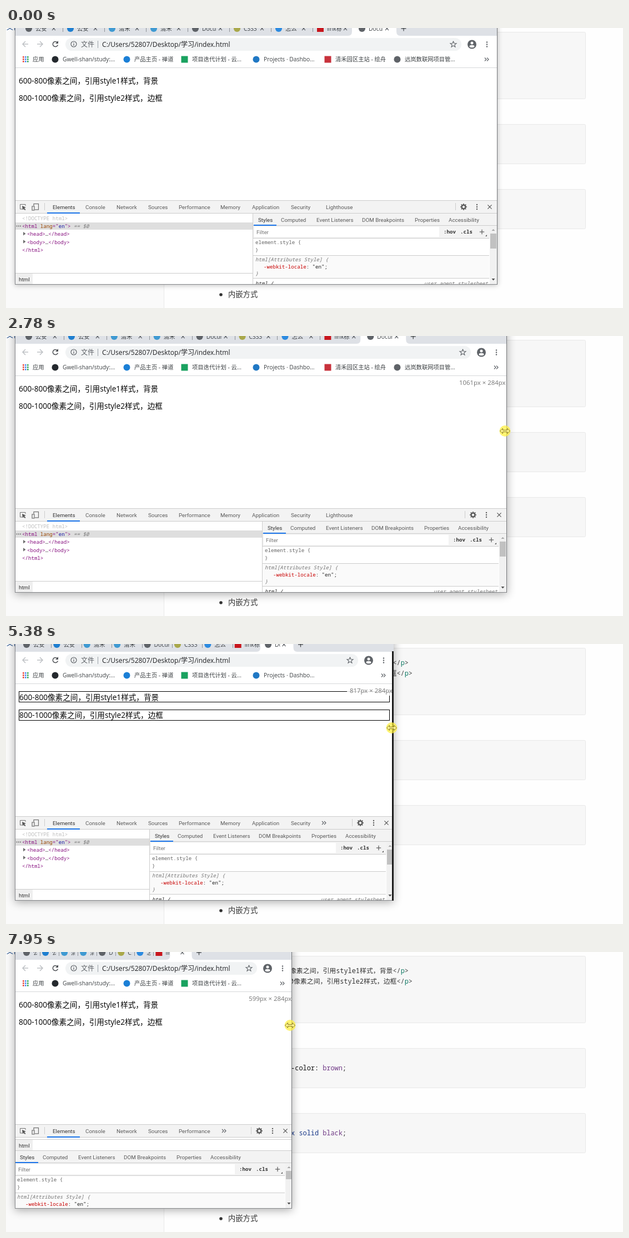
Animation, 1111 px wide and 504 px high, one loop 8000 ms. Source, as an HTML page with a canvas:

```html
<!DOCTYPE html>
<html lang="zh">
<head>
<meta charset="utf-8">
<title>Responsive resize</title>
<style>
html, body { margin: 0; width: 100%; height: 100%; overflow: hidden; background: #fff; }
canvas { display: block; width: 100vw; height: 100vh; }
</style>
</head>
<body>
<canvas id="stage" width="1111" height="504"></canvas>
<script>
const g = document.getElementById('stage').getContext('2d');
const LOOP = 8000, STEP = 77.65, LEFT = 16, BOTTOM = 462;
const CJK = '"Noto Sans CJK SC", "Noto Sans CJK", sans-serif';
const UI = '"Open Sans", ' + CJK, DEV = 'Roboto, ' + CJK;
const MONO = '"Noto Sans Mono", "Noto Sans CJK SC", monospace';
const GREY = '#5f6368', LINE = '#cccccc', BLUE = '#1a73e8';

// [time, right edge of the window]
const EDGE = [[1140, 884], [1250, 892], [1300, 895], [1345, 899], [1860, 935], [2100, 935],
  [2640, 901.5], [2742, 901], [2820, 900], [3500, 858], [4355, 777], [4405, 770], [4450, 765],
  [5220, 716], [5287, 698], [5337, 698.5], [5382, 697], [6080, 651], [6375, 618.3], [6425, 617.5],
  [6470, 612], [6940, 592], [7800, 531], [7850, 516.2], [7900, 515.5], [7945, 514]];
const POINTER_Y = [[690, 181], [1345, 173], [2742, 171], [4450, 161], [5382, 151], [6470, 139], [7945, 132]];

const TABS = [['公安', GREY], ['公安', '#1f7fd0'], ['清禾', '#3f9ad2'], ['清禾', '#3f9ad2'], ['Document', GREY],
  ['CSS3', '#a9a84a'], ['怎么', '#2d8be0'], ['link标', '#c8161d', 1], ['Document', GREY]];
// [label, x, right end, icon colour, square]
const MARKS = [['Gwell-shan/study:...', 102, 194, '#24292e'], ['产品主页 - 禅道', 231, 302, '#1b7fd6'],
  ['项目迭代计划 - 云...', 335, 425, '#1aa260', 1], ['Projects · Dashbo...', 464, 556, '#2078c4'],
  ['清禾园区主站 - 绘舟', 593, 684, '#c8323c', 1], ['远岚数联网项目管...', 718, 806, GREY]];
const PANELS = [['Elements', 84, 133], ['Console', 143, 188], ['Network', 199, 246], ['Sources', 256, 300],
  ['Performance', 311, 376], ['Memory', 386, 432], ['Application', 443, 501], ['Security', 513, 556],
  ['Lighthouse', 576, 633]];
const SIDE = [['Styles', 9], ['Computed', 50], ['Event Listeners', 114], ['DOM Breakpoints', 196],
  ['Properties', 291], ['Accessibility', 352]];

function track(keys, t) {
  if (t <= keys[0][0]) return keys[0][1];
  for (let i = 1; i < keys.length; i++) {
    const [a, v] = keys[i - 1], [b, w] = keys[i];
    if (t <= b) return v + (w - v) * (t - a) / (b - a);
  }
  return keys[keys.length - 1][1];
}

function rect(x, y, w, h, color) {
  g.fillStyle = color;
  g.fillRect(x, y, w, h);
}

function text(s, x, cy, size, family, color, style = '', align = 'left') {
  g.font = `${style} ${size}px ${family}`;
  g.fillStyle = color;
  g.textAlign = align;
  g.fillText(s, x, Math.round(cy + size * 0.36));
  return x + g.measureText(s).width;
}

const ui = (s, x, y, color = '#3c4043', size = 10.3) => text(s, x, y, size, UI, color);
const dev = (s, x, y, color = '#5a5a5a') => text(s, x, y, 9.8, DEV, color);
const mono = (s, x, y, color, style, align) => text(s, x, y, 9.15, MONO, color, style, align);

// coloured runs: [text, colour, text, colour, ...]
function runs(parts, x, y, size = 9.15) {
  for (let i = 0; i < parts.length; i += 2) x = text(parts[i], x, y, size, MONO, parts[i + 1]);
}

function disc(x, y, r, color) {
  g.fillStyle = color;
  g.beginPath();
  g.arc(x, y, r, 0, 7);
  g.fill();
}

function ring(x, y, r, color, width = 1.2, from = 0, to = Math.PI * 2) {
  g.strokeStyle = color;
  g.lineWidth = width;
  g.beginPath();
  g.arc(x, y, r, from, to);
  g.stroke();
}

function path(points, color, width = 1.2, fill) {
  g.beginPath();
  for (let i = 0; i < points.length; i += 2) g.lineTo(points[i], points[i + 1]);
  if (fill) {
    g.closePath();
    g.fillStyle = fill;
    g.fill();
  }
  if (color) {
    g.strokeStyle = color;
    g.lineWidth = width;
    g.stroke();
  }
}

function cross(x, y, r, color) {
  path([x - r, y - r, x + r, y + r], color);
  path([x - r, y + r, x + r, y - r], color);
}

function plus(x, y, r, color) {
  path([x - r, y, x + r, y], color);
  path([x, y - r, x, y + r], color);
}

function dots(x, y, color) {
  for (const d of [-4, 0, 4]) disc(x, y + d, 1.2, color);
}

function chevrons(x, y) {
  for (const d of [-3, 1]) path([x + d, y - 3, x + d + 3, y, x + d, y + 3], GREY);
}

function icon(x, y, color, square) {
  if (square) rect(x - 6, y - 6, 12, 12, color);
  else disc(x, y, 6, color);
}

function clipped(x, y, w, h, paint) {
  g.save();
  g.beginPath();
  g.rect(x, y, w, h);
  g.clip();
  paint();
  g.restore();
}

function backdrop() {
  rect(0, 0, 1111, 504, '#fefefe');
  rect(0, 0, 284, 504, '#fafafa');
  rect(284, 0, 1, 504, '#e9e9e9');
  ui('文件', 1, -1, '#1f4e8c', 12);
  for (const [y, h] of [[7, 120], [173, 71], [290, 71]]) {
    g.beginPath();
    g.roundRect(340.5, y + 0.5, 703, h, 2);
    g.fillStyle = '#f7f7f7';
    g.fill();
    g.strokeStyle = '#e8e8e8';
    g.lineWidth = 1;
    g.stroke();
  }
  const code = (parts, right, y) => {
    g.font = `11.9px ${MONO}`;
    const w = g.measureText(parts.filter((_, i) => i % 2 === 0).join('')).width;
    runs(parts, right - w, y, 11.9);
  };
  const para = s => ['<p>', '#22594f', s, '#333', '</', '#444', 'p', '#117a65', '>', '#444'];
  code(para('600-800像素之间，引用style1样式，背景'), 725, 34);
  code(para('800-1000像素之间，引用style2样式，边框'), 732, 53);
  code(['background-color: ', '#111', 'brown', '#703a86', ';', '#333'], 613, 209);
  code(['border: ', '#111', '1px solid ', '#1b3a8a', 'black', '#703a86', ';', '#333'], 613, 326);
  disc(387, 480, 2.8, '#333');
  ui('内嵌方式', 400, 479.5, '#333', 13.3);
}

function tabStrip(w) {
  const s = (w - 209) / 9, wide = s > 66;
  rect(LEFT, 0, 1000, 14, '#dee1e6');
  const a = 27 + 8 * s, b = a + s;
  g.fillStyle = '#fff';
  g.beginPath();
  g.moveTo(a - 11, 14);
  g.quadraticCurveTo(a - 4, 14, a - 4, 6);
  g.lineTo(a - 4, 0);
  g.lineTo(b + 1, 0);
  g.lineTo(b + 1, 6);
  g.quadraticCurveTo(b + 1, 14, b + 8, 14);
  g.fill();
  TABS.forEach(([name, color, square], i) => {
    const x = 27 + s * i, active = i === 8;
    const ix = x + (wide ? 14 : 10), end = x + s - (wide || active ? 23 : 5);
    if (!active || s > 42) icon(ix, 1, color, square);
    clipped(ix + 10, 0, Math.max(0, end - ix - 10), 14, () => ui(name, ix + 12, 1));
    if (wide || active) cross(x + s - 16, 1, 3, GREY);
    if (i < 7) rect(Math.round(x + s), 0, 1, 7, '#8d9196');
  });
  plus(41 + 9 * s, 1, 4.5, '#3c4043');
}

function toolbar(w) {
  rect(LEFT, 14, 1000, 57, '#fff');
  for (const [x, d] of [[35, -1], [61, 1]]) {
    path([x - 5 * d, 29, x + 5 * d, 29], '#b9bcc0', 1.4);
    path([x, 24, x + 5 * d, 29, x, 34], '#b9bcc0', 1.4);
  }
  ring(89, 29, 4.6, '#4a4d51', 1.5, 0.3, 5.4);
  path([94, 23, 94, 28, 89, 28], null, 1, '#4a4d51');

  g.fillStyle = '#f1f3f4';
  g.beginPath();
  g.roundRect(107, 18, w - 171, 23, 11.5);
  g.fill();
  ring(122, 29, 5, GREY);
  rect(121.4, 28, 1.2, 4, GREY);
  rect(121.4, 25.7, 1.2, 1.3, GREY);
  ui('文件', 135, 29.5, GREY, 12);
  rect(165, 23, 1, 13, '#9aa0a6');
  ui('C:/Users/52807/Desktop/学习/index.html', 173, 29.5, '#202124', 12.1);

  const star = [];
  for (let i = 0; i <= 10; i++) {
    const r = i % 2 ? 2.4 : 5.8, a = i * Math.PI / 5 - Math.PI / 2;
    star.push(w - 78.5 + r * Math.cos(a), 29.5 + r * Math.sin(a));
  }
  path(star, GREY, 1.1);
  const ax = w - 45;
  disc(ax, 29.5, 8, GREY);
  disc(ax, 27, 2.5, '#fff');
  g.fillStyle = '#fff';
  g.beginPath();
  g.ellipse(ax, 33, 4.5, 2.2, 0, 0, 7);
  g.fill();
  dots(w - 18, 29.5, GREY);

  const hues = ['#ea4335', '#4285f4', '#34a853', '#fbbc05'];
  for (let i = 0; i < 9; i++) rect(30 + i % 3 * 4, 51 + (i / 3 | 0) * 4, 2.6, 2.6, hues[(i + (i / 3 | 0)) % 4]);
  ui('应用', 48, 56.5);
  for (const [name, x, end, color, square] of MARKS) {
    if (end > w - 35) break;
    icon(x - 13.5, 56.5, color, square);
    ui(name, x, 56.5);
  }
  chevrons(w - 19, 56.5);
  rect(LEFT, 71, 1000, 1, '#d5d7da');
}

function page(w, px, labelRight, showLabel) {
  rect(LEFT, 72, 1000, 238, '#fff');
  const border = px <= 1000 && px > 800, fill = px <= 800 && px >= 600;
  const lines = ['600-800像素之间，引用style1样式，背景', '800-1000像素之间，引用style2样式，边框'];
  lines.forEach((s, i) => {
    const right = w - 7;
    if (fill) rect(23, 86 + 31 * i, right - 23, 17, '#a52a2a');
    if (border) {
      g.strokeStyle = '#000';
      g.lineWidth = 1;
      g.strokeRect(23.5, 85.5 + 33 * i, Math.round(right) - 24, 19);
    }
    ui(s, border ? 24 : 23, border ? 96 + 32.5 * i : 95 + 31 * i, '#000', 13.6);
  });
  if (showLabel) {
    const s = px + 'px × 284px', right = labelRight - 2;
    g.font = `11.4px ${UI}`;
    const width = g.measureText(s).width;
    rect(right - width - 5, 72, width + 10, 21, 'rgba(255,255,255,.85)');
    text(s, right, 83.5, 11.4, UI, '#757575', '', 'right');
  }
  return border;
}

function panelBar(w) {
  rect(LEFT, 310, 1000, 24, '#f3f3f3');
  rect(LEFT, 310, 1000, 1, LINE);
  rect(LEFT, 333, 1000, 1, LINE);
  path([33, 326, 25.5, 326, 25.5, 317.5, 35, 317.5, 35, 320], '#6e6e6e', 1);
  path([29, 320, 36, 323, 33, 324, 35.5, 327, 34, 328, 31.5, 325, 30, 327], null, 1, '#555');
  g.strokeStyle = '#6e6e6e';
  g.lineWidth = 1.2;
  g.strokeRect(50, 316.5, 8.5, 10.5);
  rect(46, 320, 6, 8.5, '#f3f3f3');
  g.strokeRect(47, 321, 4, 7);
  rect(69, 315, 1, 13, LINE);
  const limit = w - 75;
  let end = 0, all = true;
  for (const [name, x, right] of PANELS) {
    const last = name === 'Lighthouse';
    if (right + (last ? 0 : 22) > limit) {
      all = false;
      break;
    }
    dev(name, x, 322, x === 84 ? '#333' : undefined);
    end = right;
  }
  if (!all) chevrons(end + 16, 322);
  rect(74, 332, 59, 2, BLUE);
  rect(Math.round(limit), 315, 1, 13, LINE);
  const gx = w - 60;
  ring(gx, 322, 3.4, '#5a5a5a', 2.4);
  for (let i = 0; i < 8; i++) disc(gx + 5 * Math.cos(i * Math.PI / 4), 322 + 5 * Math.sin(i * Math.PI / 4), 1.1, '#5a5a5a');
  dots(w - 36, 322, '#5a5a5a');
  cross(w - 13, 322, 3.6, '#5a5a5a');
}

function tree(right) {
  const tag = '#881280';
  rect(LEFT, 334, right - LEFT, 128, '#fff');
  clipped(LEFT, 334, right - LEFT, 128, () => {
    mono('<!DOCTYPE html>', 29, 342.5, '#bdbdbd');
    rect(LEFT, 350, right, 13, '#dedede');
    for (const x of [19.5, 22.8, 26]) disc(x, 356.5, 1, '#666');
    runs(['<html ', tag, 'lang', '#994500', '="', tag, 'en', '#1a1aa6', '">', tag], 29, 357);
    mono('== $0', 122, 357, '#777', 'italic');
    ['head', 'body'].forEach((name, i) => {
      const y = 371 + 14.3 * i;
      path([31, y - 4, 31, y + 2.5, 35.5, y - 0.7], null, 1, '#6e6e6e');
      runs([`<${name}>`, tag, '…', '#333', `</${name}>`, tag], 38, y);
    });
    mono('</html>', 29, 399.5, tag);
    crumbs(442, right);
  });
}

function crumbs(y, right) {
  rect(LEFT, y, right - LEFT, 19, '#fff');
  rect(LEFT, y - 1, right - LEFT, 1, LINE);
  rect(LEFT, y, 32, 19, '#efefef');
  dev('html', 23, y + 10, '#333');
}

function styles(x, y, w) {
  const width = w - x, body = w - 14;
  rect(x, y + 1, width + 30, 200, '#fff');
  rect(x, y + 1, width + 30, 45, '#f3f3f3');
  rect(x, y + 22, width, 1, LINE);
  for (const [name, dx] of SIDE) dev(name, x + dx, y + 12, dx === 9 ? '#333' : undefined);
  rect(x + 1, y + 21, 41, 2, BLUE);
  rect(x + 2, y + 25, w - 104 - x - 2, 18, '#fff');
  dev('Filter', x + 6, y + 34, '#777');
  mono(':hov', w - 96, y + 34, '#333', 'bold');
  mono('.cls', w - 66, y + 34, '#333', 'bold');
  plus(w - 27, y + 34, 4.2, '#5a5a5a');
  path([w - 18, y + 42, w - 21, y + 42, w - 18, y + 39], null, 1, '#555');
  rect(x, y + 45, body - x, 1, LINE);

  mono('element.style {', x + 4, y + 53, '#666');
  mono('}', x + 4, y + 67, '#666');
  rect(x, y + 76, body - x, 1, LINE);
  rect(x, y + 77, body - x, 41, '#fafafa');
  mono('html[Attributes Style] {', x + 4, y + 84, '#777', 'italic');
  runs(['-webkit-locale', '#c80000', ': ', '#333', '"en"', '#222', ';', '#333'], x + 19, y + 97);
  mono('}', x + 4, y + 109, '#777', 'italic');
  rect(x, y + 117, body - x, 1, LINE);
  mono('html {', x + 4, y + 127, '#333', 'italic');
  mono('user agent stylesheet', w - 16, y + 127, '#777', 'italic', 'right');

  const sx = body + 1;
  rect(sx, y + 24, 13, 200, '#f1f1f1');
  rect(sx + 1, y + 37, 11, y > 350 ? 15 : 27, '#c1c1c1');
  path([sx + 3.5, y + 32, sx + 9.5, y + 32, sx + 6.5, y + 29], null, 1, '#a3a3a3');
  path([sx + 3.5, 451, sx + 9.5, 451, sx + 6.5, 454.5], null, 1, '#505050');
}

function devtools(w) {
  panelBar(w);
  if (w < 590) {
    rect(LEFT, 334, 1000, 4, '#fff');
    crumbs(338, w + 30);
    rect(LEFT, 357, 1000, 1, LINE);
    styles(LEFT, 357, w);
  } else {
    const split = Math.round(w - 440);
    tree(split);
    styles(split + 1, 333, w);
    rect(split, 334, 1, 128, LINE);
  }
}

function pointer(T, edge) {
  if (T < 100) return;
  let x = edge - 2.5, y = track(POINTER_Y, T);
  const intro = Math.min(1, (T - 100) / 560);
  if (intro < 1) {
    const k = Math.pow(1 - intro, 2);
    x += (1013 - x) * k;
    y += (473 - y) * k;
  }
  disc(x, y, 10, 'rgba(255,240,60,.72)');
  if (intro < 1) {
    path([x, y, x, y + 14, x + 3, y + 11, x + 6, y + 16, x + 8, y + 15, x + 5.5, y + 10, x + 10, y + 10, x, y], '#222', 0.9, '#fff');
  } else {
    path([-9, 0, -4, -4.5, -4, -1.5, 4, -1.5, 4, -4.5, 9, 0, 4, 4.5, 4, 1.5, -4, 1.5, -4, 4.5, -9, 0]
      .map((v, i) => v + (i % 2 ? y : x)), '#7d6c1c', 0.9, '#fff58f');
  }
}

function draw(t) {
  const T = 2820 + STEP * Math.floor((t - 2820) / STEP + 0.2);
  const edge = track(EDGE, T), inner = track(EDGE, T - 45), label = track(EDGE, T - 95);
  const px = Math.round((label - 17) * 1.2), focused = t >= 1000;
  const right = Math.round(edge) + 1;

  backdrop();
  g.save();
  g.shadowColor = focused ? 'rgba(0,0,0,.32)' : 'rgba(0,0,0,.26)';
  g.shadowBlur = focused ? 15 : 9;
  g.shadowOffsetY = focused ? 3 : 1;
  rect(LEFT, -30, right - LEFT, BOTTOM + 30, '#fff');
  g.restore();

  let heavy = false;
  clipped(LEFT, 0, right - LEFT, BOTTOM, () => {
    const w = Math.round(inner);
    tabStrip(inner);
    toolbar(Math.round(Math.max(edge, inner)));
    heavy = page(w, px, label, T > 1140);
    devtools(w);
  });
  rect(LEFT, 0, 1, BOTTOM, '#85878a');
  rect(LEFT, BOTTOM - 1, right - LEFT, 1, '#85878a');
  if (heavy) rect(right - 3, 13, 3, BOTTOM - 13, '#1c1c1c');
  else rect(right - 1, 0, 1, BOTTOM, '#75777a');
  pointer(T, edge);
}

const start = performance.now();
function tick() {
  draw((performance.now() - start) % LOOP);
  requestAnimationFrame(tick);
}
tick();
</script>
</body>
</html>
```
